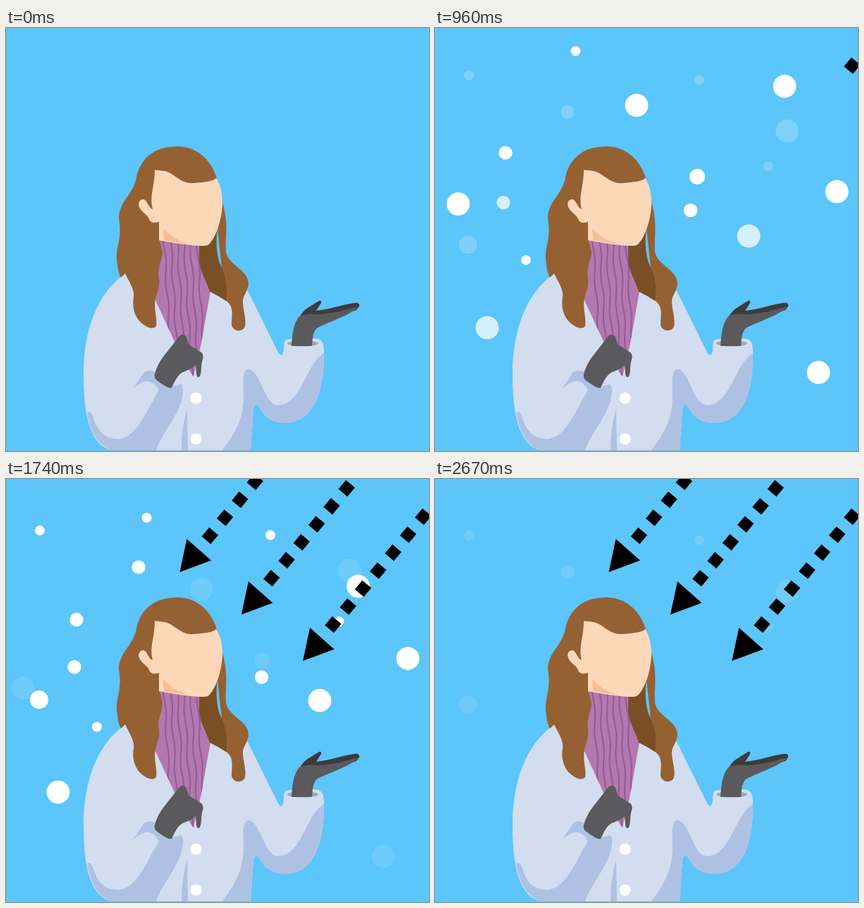
An HTML page for the animation above (2.7 s loop, 600 by 600 pixels).

```html
<!DOCTYPE html>
<html lang="en">
<head>
<meta charset="utf-8">
<title>Snowfall</title>
<style>
  html, body { margin: 0; height: 100%; overflow: hidden; background: #5cc5fa; }
  svg { display: block; width: 100vw; height: 100vh; }
</style>
</head>
<body>
<svg viewBox="0 0 600 600">
  <g id="snow" fill="#fff"></g>

  <g id="coat">
    <path fill="#d2ddef" d="M167 350C128 378 110 432 110 490C110 552 120 592 150 599H347L351 540Q354 530 359 537C367 553 378 560 398 560C432 559 452 525 451 457Q451 444 443 441Q420 438 397 442Q394 444 394 454C393 466 390 466 386 460L343 373L280 320H200Z"/>
    <g fill="#aec1e3">
      <path d="M180 512L196 488Q203 484 213 488L211 496Q228 514 248 505Q252 508 251 516C250 545 222 572 213 599H150Q122 590 115 545Q120 543 123 550C130 575 143 583 160 583C188 579 200 540 217 514Q204 489 180 512Z"/>
      <path d="M257 541Q249 565 249 599H258Z"/>
      <path d="M307 599C327 572 337 553 337 520C336 500 336 484 344 484C362 486 365 534 386 535C420 534 424 478 451 461C452 525 432 559 398 560C378 560 367 553 359 537Q354 530 351 540L347 599Z"/>
    </g>
    <ellipse cx="421" cy="447.5" rx="22" ry="4.2" fill="#9fa5b4"/>
    <circle cx="269.5" cy="525" r="8" fill="#fff"/>
    <circle cx="269.5" cy="583" r="8" fill="#fff"/>
  </g>

  <clipPath id="knit"><path d="M212 300H290V373L277 447L266 494Q262 492 240 447L212 386Z"/></clipPath>
  <g clip-path="url(#knit)">
    <path fill="#b478b0" d="M200 290H300V500H200Z"/>
    <path id="ribs" fill="none" stroke="#935a91" stroke-width="2"/>
  </g>

  <g id="hair">
    <path fill="#956132" d="M303 235C318 275 310 295 312 318C316 337 344 343 344 363C342 377 335 380 336 390C337 403 341 412 339 423C336 432 322 431 320 421C320 405 324 395 311 386L300 285Z"/>
    <path fill="#7a4f26" d="M301 280C296 300 300 325 303 333C309 347 316 360 312 387Q302 380 289 374C282 352 274 345 274 325V305Z"/>
    <path fill="#956132" d="M243 168C207 168 190 188 185 212C181 236 160 246 160 270C166 302 153 312 158 335Q159 347 163 354L169 348C173 358 183 370 181 382C178 400 185 415 197 422Q208 429 213 423C215 410 209 400 212 384C213 375 219 370 217 355C214 340 222 330 222 318Q220 307 217 300L222 220L299 213C292 190 273 168 243 168Z"/>
  </g>

  <g id="face">
    <path fill="#fcd8b9" d="M211 201L298 213C305 223 307 236 307 250C306 276 295 303 286 308Q276 312 217 301V275Q207 278 204 273C200 262 190 262 188 250Q189 242 196 243C201 246 202 255 208 257C203 237 211 226 211 201Z"/>
    <path fill="#f8bd90" d="M223 284Q237 301 263 307L224 301Z"/>
    <path fill="#956132" d="M210 204Q211 200 222 202C240 205 245 221 266 220C281 219 300 217 298 211L270 182L225 185Z"/>
  </g>

  <g id="gloves">
    <path fill="#3d3a3c" d="M407 436C412 417 418 403 428 397L444 387Q448 386 447 390L440 401C460 399 478 392 494 390Q502 389 501 395L497 400L440 420Z"/>
    <path fill="#5a595b" d="M405 451C406 434 408 418 416 409Q425 404 440 406C462 406 480 400 500 395C491 406 465 414 442 425C435 430 435 440 434 451Z"/>
    <path fill="#5a595b" d="M211 491Q214 478 224 465L246 437Q251 432 256 438L259 449L277 460Q281 463 279 470C276 478 278 488 275 494Q271 498 270 490L269 478Q263 484 251 488C242 493 239 503 235 510Q231 513 213 499Q210 496 211 491Z"/>
  </g>

  <g id="arrows"></g>
</svg>
<script>
const LOOP = 2700, FADE = 450;
const STEP = { x: 21.3, y: 25.5, time: 110 }, ARROWS_DONE = 1690;
const SMALL = 7, MEDIUM = 9.7, LARGE = 16.4;
const byId = id => document.getElementById(id);

function add(parent, tag, attrs) {
  const el = document.createElementNS('http://www.w3.org/2000/svg', tag);
  for (const key in attrs) el.setAttribute(key, attrs[key]);
  return parent.appendChild(el);
}

// Flakes are [x, y, radius] as they stand at 1200 ms; speed is in px per ms.
const layers = [
  { start: 40, end: 1790, speed: .06, sway: 1.25e-5, flakes: [
    [496, 97, LARGE], [286, 124, LARGE], [372, 225, 11], [33, 264, LARGE], [544, 503, LARGE]] },
  { start: 345, end: 2210, speed: .0287, flakes: [
    [199.5, 39.5, SMALL], [100, 184, MEDIUM], [362.5, 265.5, MEDIUM], [129, 336, SMALL], [570, 239, LARGE]] },
  { start: 625, end: 2370, speed: .0243, flakes: [
    [97, 253.5, MEDIUM], [445, 301, LARGE], [74, 431, LARGE]] },
  { start: 870, end: 2725, speed: .0076, flakes: [
    [48, 69, SMALL], [188, 121, MEDIUM], [375, 75.5, SMALL], [499.5, 148, LARGE], [472.5, 198, SMALL], [47, 309, 13]] }
];
for (const layer of layers) {
  layer.group = add(byId('snow'), 'g', {});
  for (const [cx, cy, r] of layer.flakes) add(layer.group, 'circle', { cx, cy, r });
}

// Built from the head back to the stage edge; dashes pop in one by one and all heads land together.
const parts = [];
function addArrow(headX, headY) {
  let x = headX, y = headY;
  for (let at = ARROWS_DONE; x < 612 && y > -12; at -= STEP.time) {
    const transform = `translate(${x} ${y})`;
    const el = at === ARROWS_DONE
      ? add(byId('arrows'), 'path', { d: 'M-21.5 26L-11.5 -21L23 9.5Z', transform })
      : add(byId('arrows'), 'path', { d: 'M-8.3 -8.3h16.6v16.6h-16.6z', transform: transform + ' rotate(39.9)' });
    parts.push({ el, at });
    x += STEP.x;
    y -= STEP.y;
  }
}
addArrow(442.6, 232);
addArrow(355.4, 166.3);
addArrow(268, 106);

let ribs = '';
for (let i = 0; i < 6; i++) {
  for (let y = 296; y < 498; y += 4) {
    const x = 224 + 9.4 * i + (y - 300) * .06 + 1.3 * Math.sin(y / 10 + i);
    ribs += `${y > 296 ? 'L' : 'M'}${x.toFixed(1)} ${y}`;
  }
}
byId('ribs').setAttribute('d', ribs);

function draw(now) {
  const t = now % LOOP;
  for (const { group, start, end, speed, sway = 0 } of layers) {
    const opacity = Math.min(1, (t - start) / FADE, (end - t) / FADE);
    group.setAttribute('opacity', Math.max(0, opacity));
    group.setAttribute('transform', `translate(${-sway * (t - 900) ** 2} ${speed * (t - 1200)})`);
  }
  for (const { el, at } of parts) el.setAttribute('visibility', t >= at ? 'visible' : 'hidden');
}

const origin = performance.now();
function tick() {
  draw(performance.now() - origin);
  requestAnimationFrame(tick);
}
tick();
</script>
</body>
</html>
```
